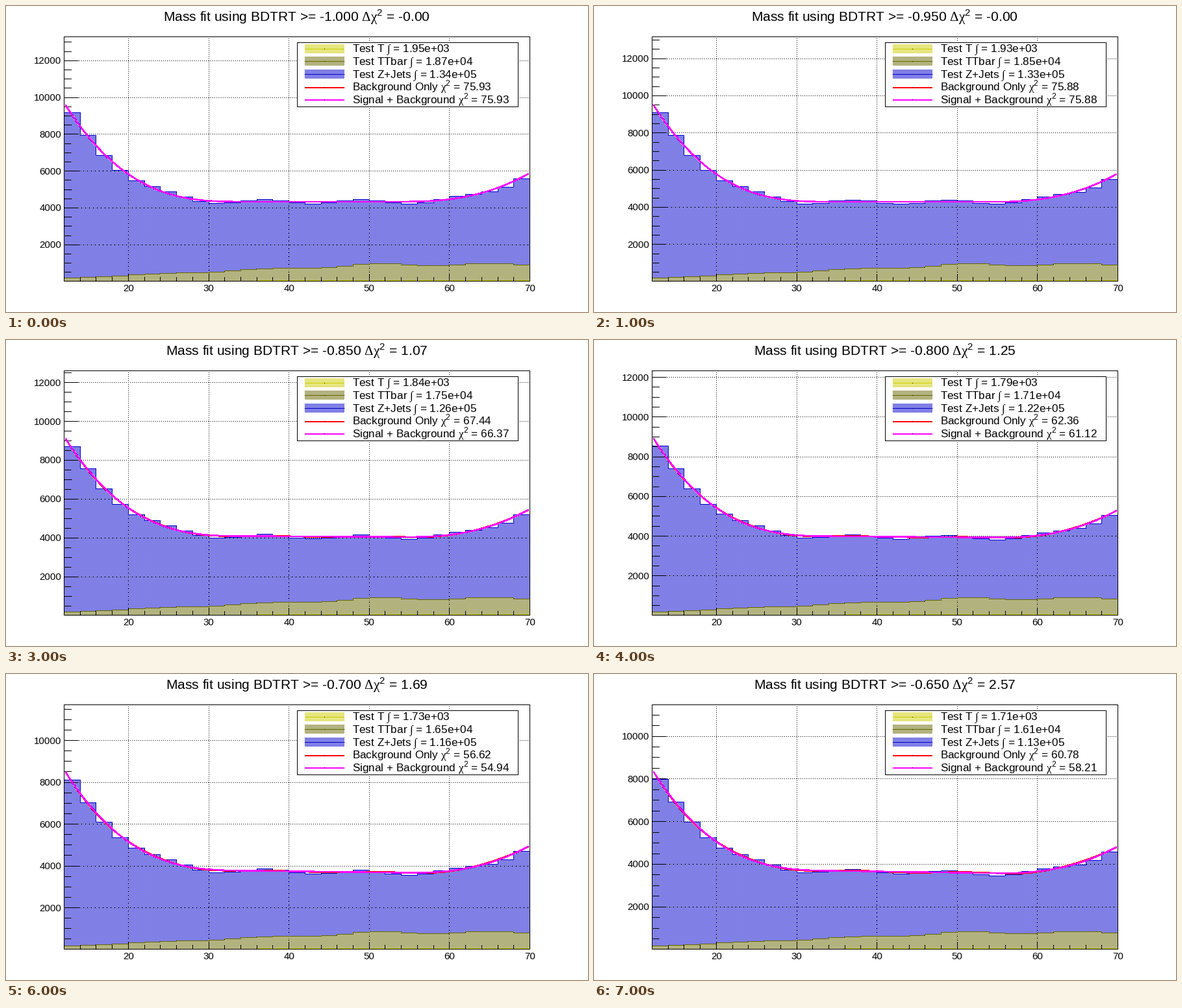
These frames come from a looping animation (896 by 472 pixels, 8 s). A matplotlib script:

```python
import numpy as np
import matplotlib.pyplot as plt
from matplotlib.animation import FuncAnimation

W, H, DPI = 896, 472, 64
LEFT, RIGHT, TOP, BASE = 89, 806, 47, 424
ZERO = 424.6  # exact height of the zero line
XMIN, XMAX, BIN = 12, 70, 2

plt.rcParams.update({
    "font.family": ["Liberation Sans", "DejaVu Sans"],
    "mathtext.fontset": "custom",
    "mathtext.cal": "Liberation Serif",
    "mathtext.rm": "Liberation Sans",
    "text.kerning_factor": 6,  # no pair kerning
})

BLACK, WHITE = (0, 0, 0), (255, 255, 255)
BLUE, OLIVE, YELLOW = (0, 0, 204), (102, 102, 0), (204, 204, 0)
RED, MAGENTA = (255, 0, 0), (255, 0, 255)

# Yields of T, TTbar and Z+Jets, chi2 of both fits, share of events cut away
STEPS = [
    (1950, 18700, 134000, 75.930, 75.931, 0.0),
    (1930, 18500, 133000, 75.880, 75.882, 0.07),
    (1900, 18100, 131000, 75.680, 75.340, 0.18),
    (1840, 17500, 126000, 67.440, 66.370, 0.38),
    (1790, 17100, 122000, 62.364, 61.117, 0.53),
    (1760, 16800, 119000, 59.200, 57.750, 0.71),
    (1730, 16500, 116000, 56.624, 54.937, 0.873),
    (1710, 16100, 113000, 60.780, 58.210, 1.0),
]


def mass_px(mass):
    return LEFT + (mass - XMIN) * (RIGHT - LEFT) / (XMAX - XMIN)


def fit(mass, w):
    """Pixel height of the fit: steep fall, nearly flat floor, late rise."""
    fall = 148 * np.clip(1 - (mass - 12.25) / 22, 0, None) ** 2.86
    rise = 44 * np.clip((mass - 54) / 16, 0, None) ** 2.54
    floor = 122.8 - w * (1 + 0.18 * (mass - 30))
    return fall + floor + rise


EDGES = [int(round(mass_px(m))) for m in range(XMIN, XMAX + 1, BIN)]
CENTERS = np.arange(XMIN + BIN / 2, XMAX, BIN)
BINS = np.arange(len(CENTERS))
SCATTER = 3.3 * np.cos(np.pi * BINS / 3)
RAMP = np.minimum(1, BINS / 19)
TTBAR = 6 + RAMP * (20 + 2 * np.cos(2 * np.pi * (BINS - 19) / 7))
SINGLE_T = 1 + (BINS >= 12)
CURVE_MASS = np.linspace(12.25, 69.8, 100)
CURVE_X = mass_px(CURVE_MASS)


def fill(img, x0, y0, x1, y1, color):
    img[y0:y1 + 1, x0:x1 + 1] = color


def stipple(img, x0, y0, x1, y1, ink):
    yy, xx = np.mgrid[y0:y1 + 1, x0:x1 + 1]
    img[y0:y1 + 1, x0:x1 + 1] = np.where(((xx + yy) % 2 == 0)[..., None], ink, WHITE)


def box(img, x0, y0, x1, y1):
    for x in (x0, x1):
        fill(img, x, y0, x, y1, BLACK)
    for y in (y0, y1):
        fill(img, x0, y, x1, y, BLACK)


def layer_tops(heights):
    return [int(round(ZERO - h)) for h in heights]


def outline(img, tops, color):
    for i, y in enumerate(tops):
        fill(img, EDGES[i], y, EDGES[i + 1], y, color)
        if i:
            lo, hi = sorted((tops[i - 1], y))
            fill(img, EDGES[i], lo, EDGES[i], hi, color)


def draw_legend(img):
    fill(img, 448, 56, 788, 155, WHITE)
    box(img, 448, 56, 788, 155)
    for i, color in enumerate((YELLOW, OLIVE, BLUE, RED, MAGENTA)):
        y = 66 + int(19.7 * i)
        if i < 3:
            stipple(img, 460, y - 7, 520, y + 6, color)
        fill(img, 460, y, 520, y + (i > 2), color)
        img[y, 490] = BLACK


def paint(bars, scale):
    img = np.full((H, W, 3), 255, np.uint8)
    row = lambda v: int(round(ZERO - v * scale))
    ymax = (BASE - TOP) / scale
    layers = [(layer_tops(h), color)
              for h, color in ((bars, BLUE), (TTBAR, OLIVE), (SINGLE_T, YELLOW))]

    for tops, color in layers:
        for x0, x1, y in zip(EDGES, EDGES[1:], tops):
            stipple(img, x0, y, x1, BASE, color)
    for m in range(20, XMAX, 10):
        img[TOP:BASE:3, int(round(mass_px(m)))] = BLACK
    for v in np.arange(2000, ymax, 2000):
        img[row(v), LEFT:RIGHT:3] = BLACK
    for tops, color in layers:
        outline(img, tops, color)

    for v in np.arange(500, ymax, 500):
        fill(img, LEFT, row(v), LEFT + (22 if v % 2000 == 0 else 11), row(v), BLACK)
    for m, x in zip(range(XMIN, XMAX + 1, BIN), EDGES):
        fill(img, x, BASE - (11 if m % 10 == 0 else 6), x, BASE, BLACK)
    box(img, LEFT, TOP, RIGHT, BASE)
    draw_legend(img)
    return img


fig = plt.figure(figsize=(W / DPI, H / DPI), dpi=DPI, facecolor="white")
ax = fig.add_axes([0, 0, 1, 1])
picture = ax.imshow(np.full((H, W, 3), 255, np.uint8), extent=(0, W, H, 0),
                    interpolation="nearest", aspect="auto")
ax.set_xlim(0, W)
ax.set_ylim(H, 0)
ax.axis("off")


def label(x, y, size, text="", **kw):
    return ax.text(x, y, text, fontsize=size * 72 / DPI, color="black", **kw)


def curve(color):
    return ax.plot([], [], color=color, lw=1.5 * 72 / DPI, antialiased=False)[0]


red, magenta = curve("#ff0000"), curve("#ff00ff")
title = label(447.5, 24, 21, ha="center")
rows = [label(533, 71 + 19.9 * i, 17.1) for i in range(5)]
y_labels = [label(85, 0, 15, ha="right") for _ in range(6)]
for mass in range(20, XMAX + 1, 10):
    label(mass_px(mass) + 0.5, 440, 15, str(mass), ha="center")

CHI2 = r"$\mathcal{χ}^{\mathregular{2}}$"
DELTA, INTEGRAL = r"$\mathcal{Δ}$", r"$\mathcal{∫}$"


def draw(i):
    *yields, bkg, sig, w = STEPS[i]
    delta = bkg - sig
    scale = 261 / (9190 - 1257 * w)
    picture.set_data(paint(fit(CENTERS, w) + SCATTER, scale))

    ys = ZERO - fit(CURVE_MASS, w)
    magenta.set_data(CURVE_X, ys)
    red.set_data(CURVE_X, ys + 0.5 * min(abs(delta), 2) * np.sin((CURVE_X - 92) / 28))

    title.set_text(f"Mass fit using BDTRT >= {-1 + 0.05 * i:.3f} {DELTA}{CHI2} = {delta:.2f}")
    names = ("Test T", "Test TTbar", "Test Z+Jets")
    lines = [f"{name} {INTEGRAL} = {n:.2e}" for name, n in zip(names, yields)]
    lines += [f"Background Only {CHI2} = {bkg:.2f}", f"Signal + Background {CHI2} = {sig:.2f}"]
    for item, line in zip(rows, lines):
        item.set_text(line)
    for k, item in enumerate(y_labels, 1):
        y = ZERO - 2000 * k * scale
        item.set_text(str(2000 * k) if y > TOP else "")
        item.set_y(y + 5.5)
    return [picture, red, magenta, title, *rows, *y_labels]


anim = FuncAnimation(fig, draw, frames=len(STEPS), interval=1000,
                     repeat=True, repeat_delay=0, blit=False)
plt.show()
```
